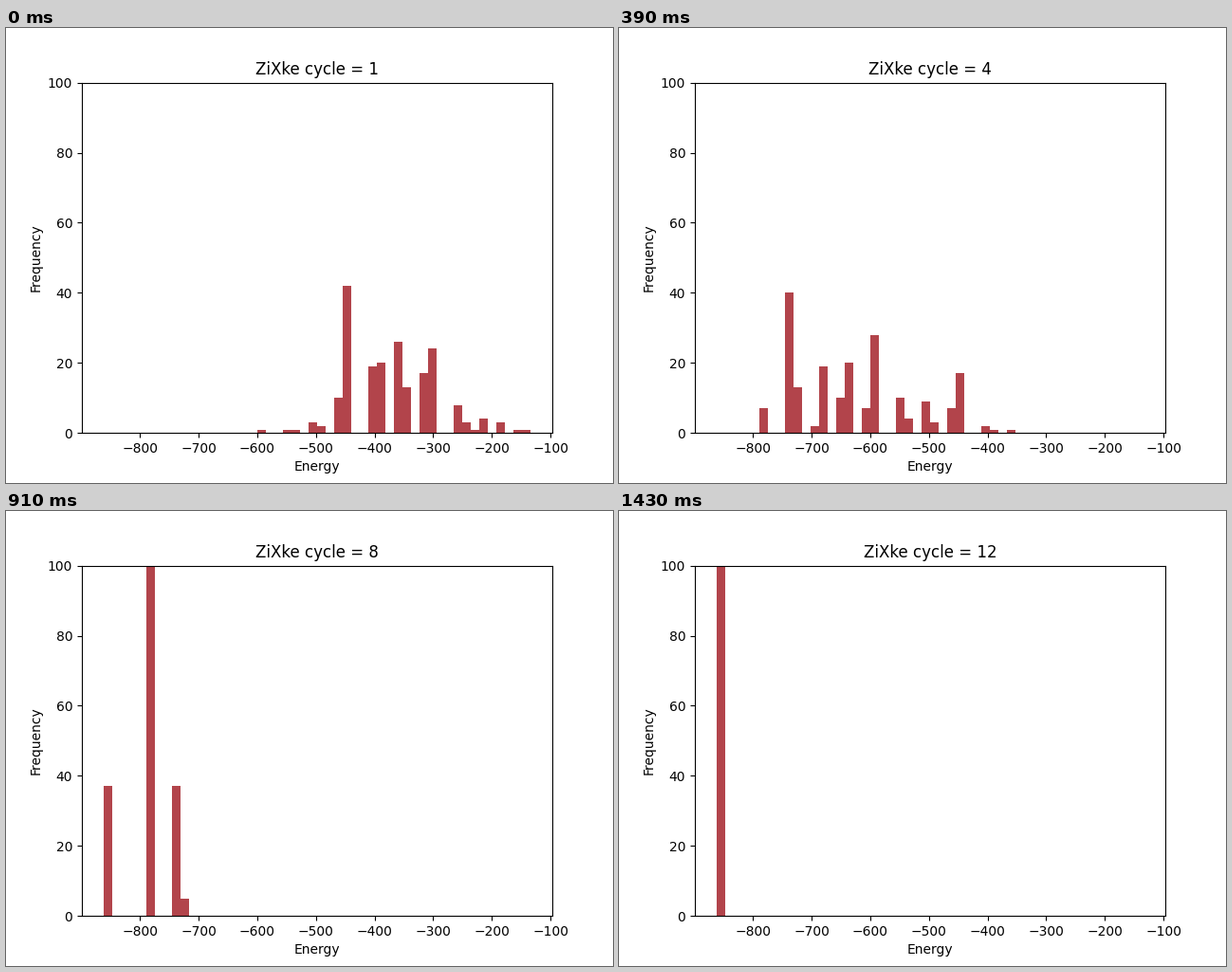
Recreate the animation shown at these times as a matplotlib script. Size 640 by 480 pixels, loop 1.56 s.

```python
import matplotlib.pyplot as plt
import numpy as np
from matplotlib.animation import FuncAnimation

BINS, SAMPLES, CYCLES = 50, 200, 12
LOW, HIGH = -862.4, -133.4
WINDOW = 6

# Energy levels in bin units; a fraction splits a level over two bins.
LEVELS = np.array([0, 5, 8.21, 11.9, 14.65, 17.8, 21.3, 24.3, 27.78,
                   31.5, 34.35, 37.62, 41.33, 43.85, 46, 48.5])
STRENGTHS = np.array([0.65, 37, 112, 24, 28, 33, 17, 26, 140,
                      73, 74, 100, 52, 50, 62, 80])


def make_spectrum():
    spectrum = np.zeros(BINS + 1)
    left = LEVELS.astype(int)
    share = LEVELS - left
    np.add.at(spectrum, left, STRENGTHS * (1 - share))
    np.add.at(spectrum, left + 1, STRENGTHS * share)
    return spectrum[:BINS]


SPECTRUM = make_spectrum()


def histogram(cycle):
    """Samples seen through a Gaussian window sinking to lower energies."""
    center = np.interp(cycle, [1, 5, 7, CYCLES], [33, 10.5, -5, -70])
    distance = (np.arange(BINS) - center) / WINDOW
    weights = SPECTRUM * np.exp(-distance**2 / 2)
    return np.round(SAMPLES * weights / weights.sum())


fig, ax = plt.subplots(figsize=(6.4, 4.8), dpi=100)
edges = np.linspace(LOW, HIGH, BINS + 1)
bars = ax.bar(edges[:-1], np.zeros(BINS), width=edges[1] - edges[0],
              align="edge", color="#b2444b")
margin = 0.05 * (HIGH - LOW)
ax.set_xlim(LOW - margin, HIGH + margin)
ax.set_ylim(0, 100)
ax.set_xlabel("Energy")
ax.set_ylabel("Frequency")
title = ax.set_title("")


def draw(frame):
    cycle = frame + 1
    for bar, count in zip(bars, histogram(cycle)):
        bar.set_height(count)
        bar.set_visible(count > 0)
    title.set_text(f"ZiXke cycle = {cycle}")
    return [*bars, title]


anim = FuncAnimation(fig, draw, frames=CYCLES, interval=130,
                     repeat=True, repeat_delay=0)
plt.show()
```
